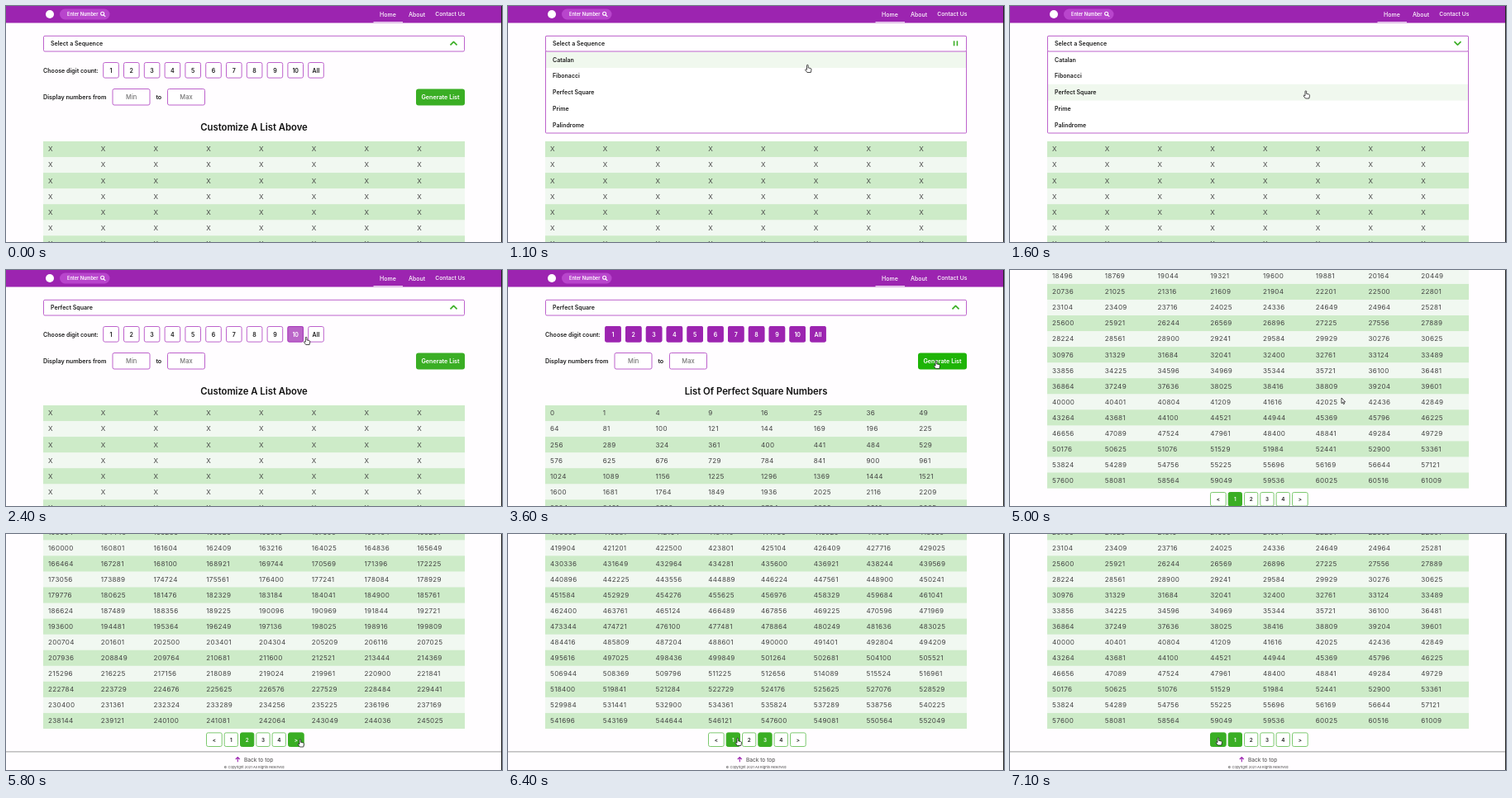
These frames come from a looping animation (600x286 px, 7.2 s). An HTML page:

```html
<!DOCTYPE html>
<html lang="en">
<head>
<meta charset="utf-8">
<title>Number list generator</title>
<style>
  html, body { margin: 0; width: 100%; height: 100%; overflow: hidden; background: #fffdff; }
  svg { display: block; width: 600px; height: 286px; }
  text { font-family: Montserrat, Inter, "Open Sans", sans-serif; white-space: pre; }
  .cell { letter-spacing: .04em; }
</style>
</head>
<body>
<svg id="stage" viewBox="0 0 600 286"></svg>
<script>
const LOOP = 7200, STEP = 100;
const PURPLE = '#9c24b0', LILAC = '#bd62cc', GREEN = '#3aae24', BRIGHT = '#1eb407', INK = '#1c1c1c';
const ROWS = 31, COLS = 8, ROW_H = 19.05, COL_W = 63.75, TOP = 164;
const END = 518.6;                     // furthest scroll position
const OPEN = 900, PICK = 1700, ALL = 2800, GENERATE = 3600;

// time, scroll
const scrollKeys = [[4000, 0], [4100, 10], [4600, 227.5], [5000, 490], [5100, END]];
// time, x, y, hand
const cursorKeys = [
  [100, 590, 255, 0], [600, 372, 60, 0], [800, 363, 47, 1], [900, 363, 47, 1],
  [1100, 362.5, 71.5, 1], [1500, 358, 103, 1], [1700, 358, 103, 0], [2100, 350, 78, 1],
  [2300, 354, 80, 1], [2400, 363.3, 81.5, 1], [2600, 374, 79, 1], [3200, 374, 79, 0],
  [3500, 518, 110.5, 1], [3800, 518, 110.5, 0], [4100, 401, 155, 0], [5200, 401, 155, 0],
  [5500, 356, 249, 1], [6100, 356, 249, 1], [6500, 252, 247, 1]
];
const tenKeys = [[2000, 0], [2200, 1], [2300, 1], [2400, .7], [2600, 0]];
const allHoverKeys = [[2400, 0], [2600, 1]];
// time, page shown from then on
const pageKeys = [[0, 1], [5600, 2], [6000, 3], [6700, 2], [6900, 1]];

const stage = document.getElementById('stage');

function add(parent, tag, attrs = {}) {
  const node = document.createElementNS('http://www.w3.org/2000/svg', tag);
  set(node, attrs);
  return parent.appendChild(node);
}
function set(node, attrs) {
  for (const k in attrs) node.setAttribute(k, attrs[k]);
}
function box(parent, x, y, w, h, fill, more) {
  return add(parent, 'rect', { x, y, width: w, height: h, fill, ...more });
}
// y is the vertical middle of the line
function label(parent, str, x, y, size, fill = INK, weight = 600, anchor = 'start') {
  const node = add(parent, 'text', {
    x, y: y + size * .36, 'font-size': size, fill, 'font-weight': weight, 'text-anchor': anchor
  });
  node.textContent = str;
  return node;
}
function framed(parent, x, y, w, h, stroke, rx = 2) {
  return box(parent, x + .5, y + .5, w - 1, h - 1, '#fff', { stroke, rx });
}
function write(node, str) {
  if (node.textContent !== str) node.textContent = str;
}
const clamp = v => Math.max(0, Math.min(1, v));

function at(keys, t, col = 1) {
  if (t <= keys[0][0]) return keys[0][col];
  for (let i = 1; i < keys.length; i++) {
    const a = keys[i - 1], b = keys[i];
    if (t < b[0]) return a[col] + (b[col] - a[col]) * (t - a[0]) / (b[0] - a[0]);
  }
  return keys[keys.length - 1][col];
}
function held(keys, t, col = 1) {
  let v = keys[0][col];
  for (const k of keys) if (t >= k[0]) v = k[col];
  return v;
}

box(stage, 0, 0, 600, 286, '#fffdff');
const page = add(stage, 'g');

// Header
box(page, 0, 0, 600, 20.5, PURPLE);
add(page, 'circle', { cx: 53, cy: 10, r: 5, fill: '#fff' });
box(page, 65, 3.5, 60.5, 13, '#b845cc', { rx: 6.5 });
label(page, 'Enter Number', 74, 10, 5.6, '#fff');
add(page, 'path', {
  d: 'M118.2 10.8L120.2 12.8M118.6 9.3a2 2 0 1 1-4 0a2 2 0 1 1 4 0',
  fill: 'none', stroke: '#fff', 'stroke-width': 1.1
});
label(page, 'Home', 462, 10, 7, '#fff', 500, 'middle');
label(page, 'About', 497, 10, 7, '#fff', 500, 'middle');
label(page, 'Contact Us', 537.3, 10, 6.8, '#fff', 500, 'middle');
box(page, 444.5, 19, 35.5, 1.5, '#ead0f0');

// Digit buttons
label(page, 'Choose digit count:', 45, 78, 7.1);
const digits = [...'123456789', '10', 'All'].map((name, i) => {
  const x = 117.2 + i * 24.8;
  framed(page, x, 68, 19.6, 19.6, LILAC);
  return {
    fill: box(page, x, 68, 19.6, 19.6, PURPLE, { rx: 2 }),
    text: label(page, name, x + 9.8, 78, 7, INK, 600, 'middle')
  };
});

// Range and generate button
label(page, 'Display numbers from', 45, 110.5, 7.2);
framed(page, 128.5, 100, 46, 20.5, LILAC);
label(page, 'Min', 151.7, 110.5, 7.5, '#777', 500, 'middle');
label(page, 'to', 184.8, 110.5, 7.2, INK, 600, 'middle');
framed(page, 195, 100, 46, 20.5, LILAC);
label(page, 'Max', 218, 110.5, 7.5, '#777', 500, 'middle');
const generate = box(page, 496, 100.5, 59, 20, GREEN, { rx: 3 });
label(page, 'Generate List', 525.5, 110.5, 7.2, '#fff', 600, 'middle');

const title = label(page, '', 300, 147, 11.3, '#111', 600, 'middle');

// Table
box(page, 45, TOP, 510, ROWS * ROW_H, '#f1f8f1');
const cells = [];
for (let r = 0; r < ROWS; r++) {
  if (r % 2 === 0) box(page, 45, TOP + r * ROW_H, 510, ROW_H, '#cdebc8');
  for (let c = 0; c < COLS; c++) {
    const cell = label(page, 'X', 51 + c * COL_W, TOP + (r + .5) * ROW_H, 8.1, '#444', 400);
    set(cell, { class: 'cell' });
    cells.push(cell);
  }
}

// Pagination and footer
const foot = add(page, 'g', { transform: `translate(0 ${END})` });
const pager = ['<', '1', '2', '3', '4', '>'].map((name, i) => {
  const wide = i === 0 || i === 5;
  const x = [242, 263.7, 283, 302.3, 321.6, 341][i], w = wide ? 19.7 : 17.3;
  return {
    x, w,
    rect: framed(foot, x, 240.4, w, 17.6, '#7cc96e'),
    text: label(foot, name, x + w / 2, 249.3, 6.3, INK, 600, 'middle')
  };
});
box(foot, 0, 263.4, 600, 1, '#9b9b9b');
add(foot, 'path', {
  d: 'M280.3 276.3V270.6M277.8 273L280.3 270.5L282.8 273',
  fill: 'none', stroke: PURPLE, 'stroke-width': 1.1
});
label(foot, 'Back to top', 288, 273.3, 6.6, '#444', 400);
label(foot, '© Copyright 2021 All Rights Reserved', 300, 282.6, 4.1, '#444', 400, 'middle');

// Sequence menu
const menu = add(page, 'g');
const names = ['Catalan', 'Fibonacci', 'Perfect Square', 'Prime', 'Palindrome'];
framed(menu, 45, 36, 510, 118.5, LILAC, 1);
const items = names.map((name, i) => {
  const y = 65.2 + i * 19.75;
  const back = box(menu, 46, y - 9.9, 508, 19.75, '#f0f8ee');
  label(menu, name, 54, y, 7);
  return { y, back };
});
framed(page, 45, 35.8, 510, 19.7, LILAC, 1.5);
const chosen = label(page, '', 54, 45.5, 7.05);
const bars = [539.6, 543.4].map(x => {
  const g = add(page, 'g', { transform: `translate(${x} 45.3)` });
  return add(g, 'path', { d: 'M0-3V3', stroke: GREEN, 'stroke-width': 1.6 });
});

box(stage, 599, 0, 1, 286, '#222');

// Cursors, tip at 0,0
const cursor = add(stage, 'g', { fill: '#fff', stroke: '#111', 'stroke-width': .75, 'stroke-linejoin': 'round' });
const hand = add(cursor, 'path', {
  d: 'M-1 .7Q-1-.2-.2-.2Q.7-.2.7.7V3.4L3.5 4Q4.6 4.3 4.5 5.6L3.8 9H-.6L-3 5.8Q-2.6 4.5-1 5.7Z'
});
const arrow = add(cursor, 'path', { d: 'M0 0V6.6L1.5 5.3L2.5 7.6L3.6 7.1L2.6 4.9H4.6Z' });

function show(node, on) {
  node.setAttribute('visibility', on ? 'inherit' : 'hidden');
}

let filled = null;
function fillTable(n) {
  if (n === filled) return;
  filled = n;
  const first = (n - 1) * ROWS * COLS;
  cells.forEach((cell, i) => write(cell, n ? String((first + i) ** 2) : 'X'));
}

function draw(t) {
  const x = at(cursorKeys, t, 1), y = at(cursorKeys, t, 2);
  const scroll = at(scrollKeys, t);
  const done = t >= GENERATE;
  const open = t >= OPEN && t < PICK;
  const current = held(pageKeys, t);

  set(page, { transform: `translate(0 ${-scroll})` });
  write(chosen, t < PICK ? 'Select a Sequence' : 'Perfect Square');
  write(title, done ? 'List Of Perfect Square Numbers' : 'Customize A List Above');
  fillTable(done ? current : 0);

  show(menu, open);
  for (const item of items) show(item.back, open && Math.abs(y - item.y) < 9.9);
  const turn = clamp((t - OPEN) / 400) - clamp((t - PICK) / 400);
  const angle = 45 - 90 * turn;
  set(bars[0], { transform: `rotate(${angle})` });
  set(bars[1], { transform: `rotate(${-angle})` });

  const selected = clamp((t - ALL) / 200);
  digits.forEach((d, i) => {
    const hover = i === 9 ? at(tenKeys, t) : i === 10 ? at(allHoverKeys, t) : 0;
    const level = Math.max(selected, hover);
    set(d.fill, { opacity: level });
    set(d.text, { fill: level > .4 ? '#fff' : INK });
  });

  set(generate, { fill: t >= 3500 && t < 3900 ? BRIGHT : GREEN });

  pager.forEach((b, i) => {
    const over = scroll === END && y > 240 && y < 258 && x >= b.x && x <= b.x + b.w;
    const on = over || i === current;
    set(b.rect, { fill: on ? GREEN : '#fff', stroke: on ? GREEN : '#7cc96e' });
    set(b.text, { fill: on ? '#fff' : INK });
  });

  show(cursor, t >= 100);
  set(cursor, { transform: `translate(${x} ${y})` });
  const isHand = held(cursorKeys, t, 3);
  show(hand, isHand);
  show(arrow, !isHand);
}

const start = performance.now();
function tick() {
  const t = (performance.now() - start) % LOOP;
  draw(Math.floor(t / STEP) * STEP);
  requestAnimationFrame(tick);
}
tick();
</script>
</body>
</html>
```
